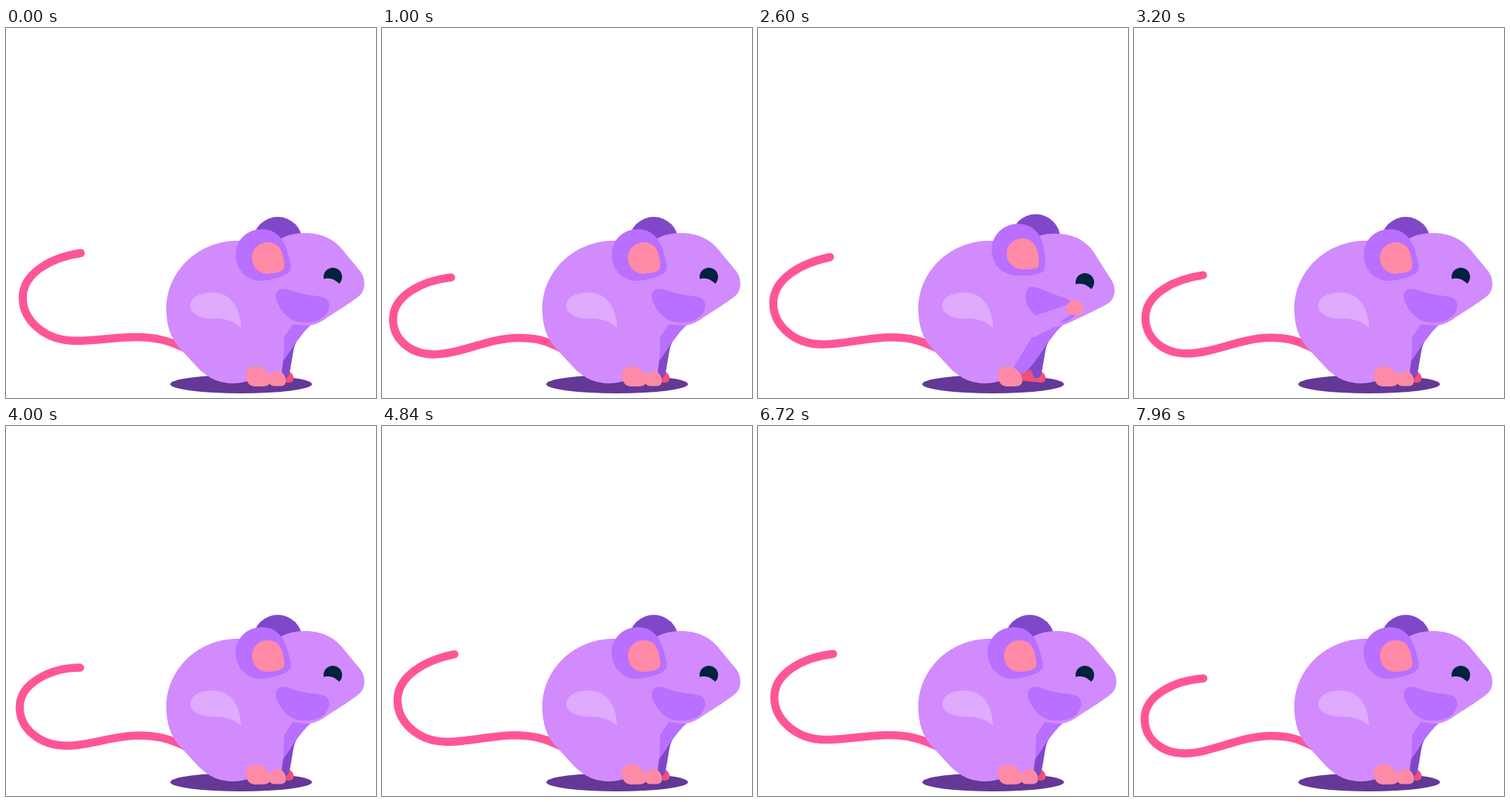
An HTML page that plays this animation: 480 px wide and 480 px high, repeating every 8000 ms.

```html
<!DOCTYPE html>
<html lang="en">
<head>
<meta charset="utf-8">
<title>Mouse</title>
<style>
html, body { margin: 0; width: 100%; height: 100%; overflow: hidden; background: #fff; }
svg { display: block; width: 100%; height: 100%; }
.skin { fill: #d18bfd; }
.shade { fill: #b96fff; }
.dark { fill: #8048c8; }
.pink { fill: #ff8aa5; }
</style>
</head>
<body>
<svg viewBox="0 0 480 480">
  <ellipse cx="305" cy="462" rx="92" ry="12" fill="#643896"/>
  <path id="tail" fill="none" stroke="#ff5596" stroke-width="10.5" stroke-linecap="round"/>
  <circle id="backEar" class="dark" r="32"/>
  <path fill="#f0507a" d="M338 442L356 442L368 446C375 450 375 460 367 460L346 458L338 456Z"/>
  <path class="dark" d="M350 400L393 386C382 396 376 405 373 418L368 447C367 454 362 456 358 453L354 443L346 447Z"/>
  <path class="skin" d="M300 276C250 276 208 315 208 365C208 385 213 402 226 416L250 442C263 455 278 461 294 461C310 461 322 456 332 446L358 400L388 384L390 290L330 276Z"/>
  <path class="shade" d="M354 403L371 384L396 385C386 394 380 403 374 411C366 423 358 436 346 448L327 448Z"/>
  <path id="head" class="skin"/>
  <path fill="#e0aaff" d="M269 343C292 344 304 362 305 389C296 381 285 377 272 377C260 378 239 374 239 360C239 349 254 343 269 343Z"/>
  <path id="cheek" class="shade"/>
  <path id="ear" class="shade"/>
  <path id="innerEar" class="pink"/>
  <circle id="eye" r="12" fill="#00223f"/>
  <path id="lid" class="skin" d="M-13 3C-5 0 4 3 10 11L1 19L-16 13Z"/>
  <path id="arm" class="skin"/>
  <path id="paw" class="pink" d="M-11 2C-11 -5 -6 -10 1 -10C7 -10 11 -3 11 3C11 8 8 9.5 3 9.5L-4 9.5C-9 9 -11 6 -11 2Z"/>
  <path class="pink" d="M311 450C311 443 317 439 325 439C333 439 343 448 343 457C343 463 339 465 332 465L322 465C314 464 311 457 311 450Z"/>
</svg>
<script>
const LOOP = 8000, STEP = 40, SWING = 2280;
const el = id => document.getElementById(id);

// Each pair holds the resting shape and the face-washing shape.
const shapes = {
  head: [
    "M340 290L355 274C366 268 376 266 388 266C412 266 427 276 436 287L460 316C466 324 467 338 460 346C451 354 430 367 416 376C408 382 400 386 390 386L365 384L340 380Z",
    "M340 290L360 272C368 268 376 267 386 267C408 267 428 276 439 297L459 330C465 340 463 354 452 360C440 366 425 373 411 379C404 382 397 385 388 388L365 386L340 380Z"],
  cheek: [
    "M355 339C363 336 370 342 381 344C392 347 404 347 413 350C422 354 421 366 413 374C404 382 390 384 377 381C362 377 351 358 350 349C350 344 352 341 355 339Z",
    "M352 336C360 334 368 339 378 343C388 347 396 350 404 354C414 358 416 366 409 375C403 381 396 384 385 384C365 380 348 368 347 352C346 344 348 338 352 336Z"],
  ear: [
    "M334 261C352 262 362 276 366 294C368 302 371 310 369 314C365 322 345 327 331 328C311 328 298 312 298 294C298 275 313 260 334 261Z",
    "M338 253C357 253 370 266 372 288C373 298 375 308 371 315C366 321 350 321 336 320C318 319 304 306 304 287C304 268 319 253 338 253Z"],
  innerEar: [
    "M340 278C351 278 357 285 359 295C361 303 363 309 359 314C354 318 347 318 340 319C328 319 319 310 319 298C319 287 328 278 340 278Z",
    "M344 272C355 272 362 281 364 292C365 300 366 307 363 310C359 313 350 312 342 312C332 311 323 303 323 292C323 281 332 272 344 272Z"],
  arm: [
    "M318 395L322 425L332 451L343 453L357 452L360 428L361 401L372 384Z",
    "M318 395L346 371L394 351L411 344L424 356L413 362L390 385L356 404Z"]
};

const lerp = (a, b, k) => a + (b - a) * k;
const clamp = x => Math.min(1, Math.max(0, x));
const ease = x => x * x * (3 - 2 * x);
const ramp = (t, from, to) => ease(clamp((t - from) / (to - from)));

function mix([a, b], k) {
  const nums = b.match(/\d+/g);
  let i = 0;
  return a.replace(/\d+/g, n => lerp(+n, +nums[i++], k).toFixed(2));
}

function place(id, ax, ay, bx, by, k) {
  el(id).setAttribute("transform", `translate(${lerp(ax, bx, k)} ${lerp(ay, by, k)})`);
}

// A swing between a cosine and a triangle wave; the tip trails a little.
function tailPath(t) {
  const a = t / SWING * 2 * Math.PI, s = Math.sin(a), cos = Math.cos(a);
  const c = lerp(cos, Math.asin(cos) * 2 / Math.PI, 0.5);
  const tx = 93.5 + 3.5 * c - 2.5 * s, ty = 310 - 18 * c - 4 * s;
  const lx = 17.7 + 4 * c, ly = 365 - 15 * c;
  const bx = 78 + 12 * c - 0.5 * s, by = 415.3 - 9.5 * c + 0.3 * s;
  const hx = 173 - 3.5 * c + 1.5 * s, hy = 401.5 - 0.5 * c;
  return `M${tx} ${ty}C${tx - 38} ${ty + 4 + 1.5 * c + 4 * s} ${lx} ${ly - 31 - c} ${lx} ${ly}` +
    `C${lx} ${ly + 27 + c} ${bx - 36 - 5 * c} ${by} ${bx} ${by}` +
    `C${bx + 30 - 3 * c} ${by} ${hx - 32 + 5 * c} ${hy} ${hx} ${hy}` +
    `C${hx + 23} ${hy} 212 405 235 417`;
}

function draw(t) {
  const k = ramp(t, 1600, 1840) - ramp(t, 2540, 2800);
  el("tail").setAttribute("d", tailPath(t));
  for (const id in shapes) el(id).setAttribute("d", mix(shapes[id], k));
  place("backEar", 352.5, 277, 361.5, 273, k);
  place("eye", 424, 323, 424, 331, k);
  place("lid", 424, 323, 424, 331, k);
  place("paw", 352, 455, 420, 348, k);
}

const start = performance.now();
function tick() {
  const t = (performance.now() - start) % LOOP;
  draw(Math.floor(t / STEP) * STEP);
  requestAnimationFrame(tick);
}
tick();
</script>
</body>
</html>
```
